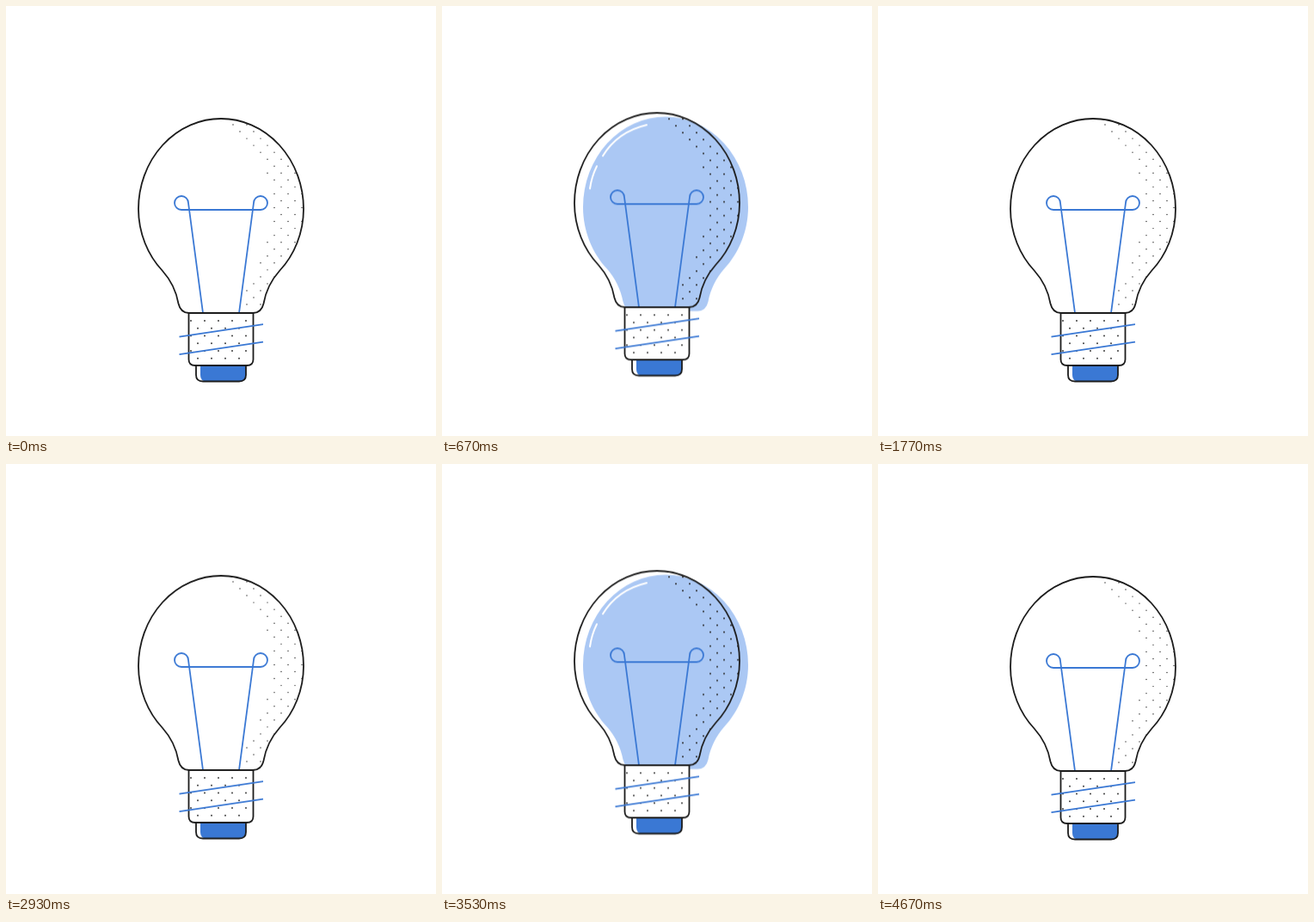
These frames come from a looping animation (500x500 px, 5.73 s). An HTML page:

```html
<!DOCTYPE html>
<html lang="en">
<head>
<meta charset="utf-8">
<title>Light bulb</title>
<style>
  html, body { margin: 0; width: 100%; height: 100%; overflow: hidden; background: #fff; }
  svg { display: block; width: 100vw; height: 100vh; }
  .ink, .wire { fill: none; stroke: #1c1c1c; stroke-width: 1.8; stroke-linejoin: round; }
  .wire { stroke: #3a78d4; }
  .dots { fill: none; stroke: #2a2a2a; stroke-width: 1.8; stroke-linecap: round; }
  .bulb, .glow, .shade, .grow, .wipe, .rays { animation: 2865ms linear infinite; }

  .bulb { animation-name: hop; }
  @keyframes hop {
    0%, 1.5% { transform: translateY(0); }
    8.4% { transform: translateY(-9.2px); animation-timing-function: ease-in-out; }
    11.9% { transform: translateY(-6.7px); }
    51.3% { transform: translateY(-6.7px); animation-timing-function: ease-out; }
    54.2% { transform: translateY(-9.2px); animation-timing-function: ease-in-out; }
    61.7%, 100% { transform: translateY(0); }
  }

  .glow { animation-name: glow; }
  @keyframes glow {
    0%, 2.4% { opacity: 0; }
    7%, 51.7% { opacity: 1; }
    51.71%, 100% { opacity: 0; }
  }

  .shade { animation-name: shade; }
  @keyframes shade {
    0%, 2.2% { stroke-width: 1.4; }
    7%, 51.3% { stroke-width: 2; }
    61.7%, 100% { stroke-width: 1.4; }
  }

  /* Rays draw outwards, then are wiped from the inner end. */
  .grow, .wipe { stroke-dasharray: 1 2; stroke-dashoffset: 1; }
  .grow { stroke: #fff; stroke-width: 6; animation-name: grow; }
  .wipe { stroke: #000; stroke-width: 8; animation-name: wipe; }
  @keyframes grow {
    0%, 2.2% { stroke-dashoffset: 1; animation-timing-function: ease-in-out; }
    16.4%, 100% { stroke-dashoffset: 0; }
  }
  @keyframes wipe {
    0%, 11.9% { stroke-dashoffset: 1; animation-timing-function: ease-in-out; }
    23.2%, 100% { stroke-dashoffset: 0; }
  }
  .rays { stroke: #1c1c1c; stroke-width: 1.8; stroke-dasharray: 19 11; animation-name: rays; }
  @keyframes rays {
    0%, 2.2% { opacity: 0; }
    2.21%, 23.1% { opacity: 1; }
    23.11%, 100% { opacity: 0; }
  }
</style>
</head>
<body>
<svg viewBox="0 0 500 500">
  <defs>
    <path id="glass" d="M250 131A96 105 0 0 1 346 236C346 264 335 290 318 308C309 318 302 332 299.5 346Q297 357 287 357H213Q203 357 200.5 346C198 332 191 318 182 308C165 290 154 264 154 236A96 105 0 0 1 250 131Z"/>
    <clipPath id="inside"><use href="#glass"/></clipPath>
    <mask id="trim" maskUnits="userSpaceOnUse" x="0" y="0" width="500" height="500"></mask>
  </defs>

  <g mask="url(#trim)"><g class="rays" id="rays"></g></g>

  <g class="bulb">
    <g class="glow">
      <use href="#glass" x="10" y="4.5" fill="#abc8f4"/>
      <path d="M172 219Q174 205 180 193M187 181Q204 153 238 145" fill="none" stroke="#fff" stroke-width="2" stroke-linecap="round"/>
    </g>
    <path class="dots shade" id="shade" clip-path="url(#inside)"/>
    <path class="wire" d="M229 357L212 229A8 8 0 1 0 204 237H296A8 8 0 1 0 288 229L271 357"/>
    <use href="#glass" class="ink"/>

    <path d="M221 418H279V429Q279 436.5 271 436.5H229Q221 436.5 221 429Z" fill="#fff"/>
    <path d="M226 418H279V429Q279 436.5 271 436.5H233Q226 436.5 226 429Z" fill="#3a78d4"/>
    <path class="ink" d="M221 418V429Q221 436.5 229 436.5H271Q279 436.5 279 429V418"/>

    <path class="ink" style="fill:#fff" d="M212.5 357H287.5V411Q287.5 418 280 418H220Q212.5 418 212.5 411Z"/>
    <path class="dots" id="collar"/>
    <path class="wire" d="M201.5 384.7L299 370.2M201.5 405.2L299 390.7"/>
  </g>
</svg>
<script>
  const $ = id => document.getElementById(id);

  // Staggered rows of dots, starting at (x0, y0).
  function lattice(x0, y0, pitch, rows, keep) {
    let d = '';
    for (let row = 0; row < rows; row++) {
      const y = y0 + row * pitch;
      for (let x = x0 + row % 2 * 8; x < 350; x += 16) {
        if (keep(x, y)) d += `M${x} ${y}h.01`;
      }
    }
    return d;
  }
  const shadeEdge = y => y < 235 ? 309 - 47 * ((y - 235) / 97) ** 2
                                 : 309 - 40 * ((y - 235) / 110) ** 2;
  $('shade').setAttribute('d', lattice(216, 138, 8.04, 27, (x, y) => x > shadeEdge(y)));
  $('collar').setAttribute('d', lattice(215, 366, 8.75, 6, x => x < 285));

  function line(parent, cls, [x, y, dx, dy]) {
    const el = document.createElementNS('http://www.w3.org/2000/svg', 'line');
    const ends = { x1: x, y1: y, x2: x + dx, y2: y + dy };
    for (const k in ends) el.setAttribute(k, ends[k]);
    if (cls) {
      el.setAttribute('class', cls);
      el.setAttribute('pathLength', 1);
    }
    parent.append(el);
  }

  // Start point and full reach of each ray; the side rays are mirrored.
  const left = [
    [187, 131, -20.5, -44],
    [145, 177, -42, -21.5],
    [137, 229, -47, -.5],
    [149, 284, -40.5, 25]
  ];
  const rays = [[249.3, 113.5, 0, -50], ...left,
    ...left.map(([x, y, dx, dy]) => [500.3 - x, y, -dx, dy])];
  for (const ray of rays) {
    line($('rays'), '', ray);
    line($('trim'), 'grow', ray);
    line($('trim'), 'wipe', ray);
  }
</script>
</body>
</html>
```
